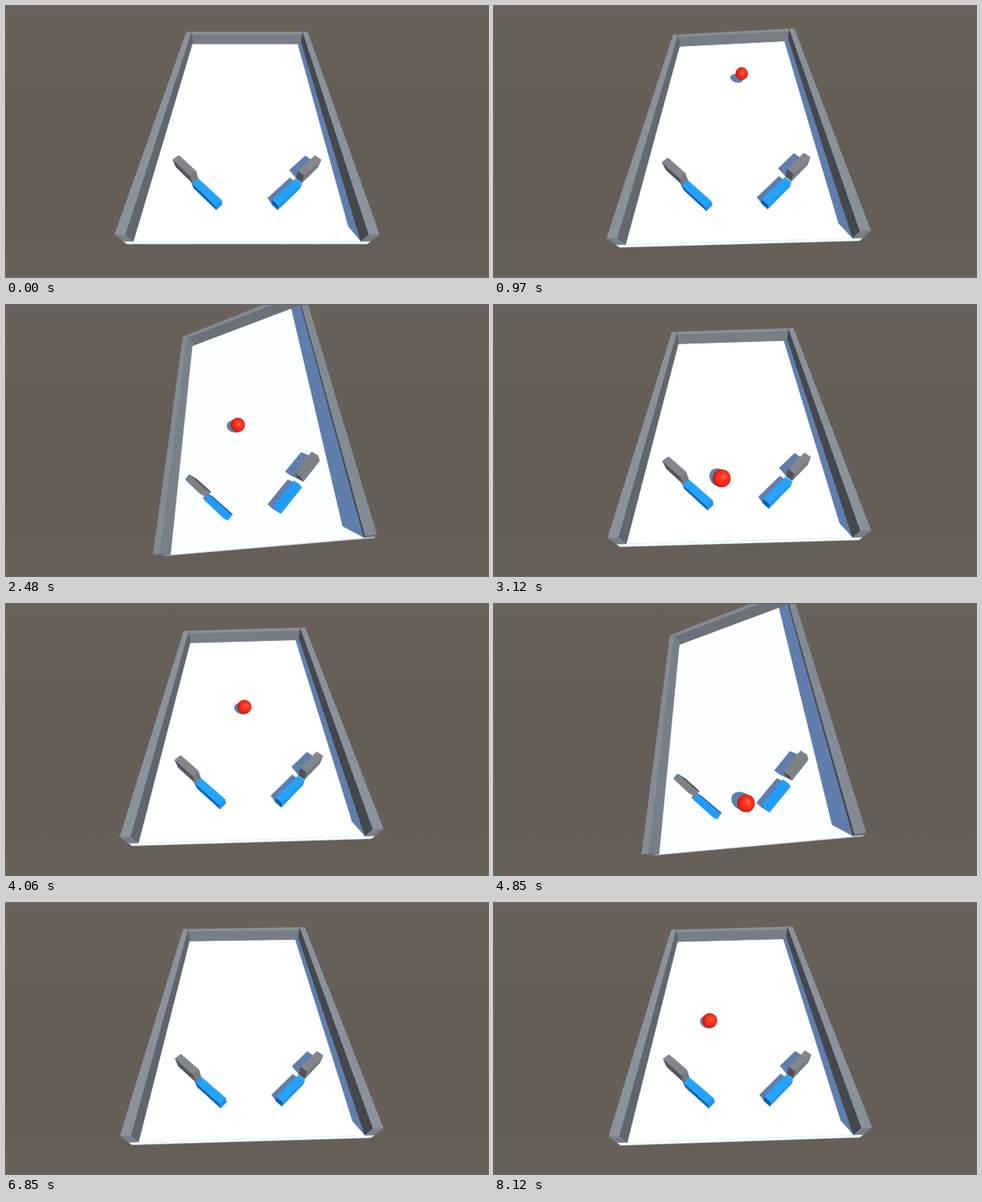
Write an HTML page with a canvas that moves like this. It is 600x338 px and loops after 8150 ms.

```html
<!DOCTYPE html>
<html lang="en">
<head>
<meta charset="utf-8">
<title>Tilting pinball table</title>
<style>
  html, body { margin: 0; width: 100%; height: 100%; overflow: hidden; background: #665f57; }
  canvas { display: block; width: 600px; height: 338px; }
</style>
</head>
<body>
<canvas id="stage" width="600" height="338"></canvas>
<script>
const ctx = document.getElementById('stage').getContext('2d');
const LOOP = 8150, FOCAL = 292.7, RAD = Math.PI / 180;
const CAM = [0, 9.89, -11.2], SIN = 0.767, COS = 0.6415;
const LIGHT = [-0.321, -0.766, 0.557];
const HALF_W = 5, HALF_L = 8.2, WALL = 0.4, WALL_H = 0.82, BALL_R = 0.42;
const GRAVITY = 16;

// Base colour plus the part added by direct light
const STEEL = { dark: [68, 71, 76], lit: [92, 98, 103] };
const STONE = { dark: [68, 69, 71], lit: [82, 86, 89] };
const BLUE = { dark: [8, 78, 150], lit: [36, 112, 150] };
const FLOOR = { dark: [190, 205, 210], lit: [90, 90, 80] };

// Ball contacts: time, x, z
const RALLY = [
  [590, 0.9, 3.5], [1680, -0.2, -6], [3180, -0.75, -6.2],
  [4870, 0.37, -6.65], [5880, -1.15, -8.72]
];
const SERVE = [[7300, -1, 3.5], [LOOP, -1.48, -2.28]];
const FLIPS = [...RALLY.slice(1, 4).map(hit => hit[0] - 20), 5800];

const clamp = v => Math.max(0, Math.min(1, v));
const smooth = v => { const u = clamp(v); return u * u * (3 - 2 * u); };
const dot = (a, b) => a[0] * b[0] + a[1] * b[1] + a[2] * b[2];

// Rises from t0 to full, holds, and is back to zero at t1
const push = (t, t0, t1) => smooth((t - t0) / 520) * smooth((t1 - t) / 540);
const tilt = t => push(t, 860, 3000) + push(t, 4190, 5880);

// Roll leads, pitch follows a little later, yaw drifts over time
function poseAt(t) {
  const drift = 1 - Math.exp(-t / 2500);
  const sway = 1 - Math.cos(t / 1000);
  return [
    20.3 * tilt(t) + 0.6 * sway,
    10 * tilt(t - 160) + 0.4 * drift,
    1.6 * tilt(t) + 1.7 * drift
  ].map(angle => angle * RAD);
}

function makeTurn([roll, pitch, yaw]) {
  const spin = (a, b, angle) => [
    a * Math.cos(angle) - b * Math.sin(angle),
    a * Math.sin(angle) + b * Math.cos(angle)
  ];
  return ([x, y, z]) => {
    [x, y] = spin(x, y, roll);
    [z, y] = spin(z, y, pitch);
    [x, z] = spin(x, z, yaw);
    return [x, y, z];
  };
}

function project([x, y, z]) {
  const dy = y - CAM[1], dz = z - CAM[2];
  const up = dy * COS + dz * SIN, depth = dz * COS - dy * SIN;
  return [300 + FOCAL * x / depth, 169 - FOCAL * up / depth, FOCAL / depth];
}

// Box centred at x, z with its long axis turned by angle
function box(x, z, angle, length, width, y0, y1, paint) {
  const c = Math.cos(angle), s = Math.sin(angle), corners = [];
  for (let i = 0; i < 8; i++) {
    const a = (i & 1 ? 1 : -1) * length / 2, b = (i & 2 ? 1 : -1) * width / 2;
    corners.push([x + a * c - b * s, i & 4 ? y1 : y0, z + a * s + b * c]);
  }
  const faces = [
    [[c, 0, s], 1, 3, 7, 5], [[-c, 0, -s], 0, 2, 6, 4],
    [[-s, 0, c], 2, 3, 7, 6], [[s, 0, -c], 0, 1, 5, 4],
    [[0, 1, 0], 4, 5, 7, 6]
  ];
  return { corners, faces, paint };
}

function tracePath(points) {
  ctx.beginPath();
  points.forEach(p => ctx.lineTo(p[0], p[1]));
  ctx.closePath();
}

function drawBox({ corners, faces, paint }, turn) {
  const world = corners.map(turn);
  for (const [normal, ...ids] of faces) {
    const n = turn(normal), p = world[ids[0]];
    if (dot(n, CAM.map((v, k) => v - p[k])) <= 0) continue;
    const light = Math.max(0, -dot(n, LIGHT));
    const rgb = paint.dark.map((v, k) => Math.min(255, Math.round(v + paint.lit[k] * light)));
    tracePath(ids.map(i => project(world[i])));
    ctx.fillStyle = ctx.strokeStyle = `rgb(${rgb})`;
    ctx.lineWidth = 0.4;
    ctx.fill();
    ctx.stroke();
  }
}

function hull(points) {
  const sorted = points.slice().sort((a, b) => a[0] - b[0] || a[1] - b[1]);
  const half = list => {
    const out = [];
    for (const p of list) {
      while (out.length > 1) {
        const [a, b] = out.slice(-2);
        if ((b[0] - a[0]) * (p[1] - a[1]) - (b[1] - a[1]) * (p[0] - a[0]) > 0) break;
        out.pop();
      }
      out.push(p);
    }
    return out.slice(0, -1);
  };
  return [...half(sorted), ...half(sorted.reverse())];
}

function drawShadow(points, turn, light) {
  const flat = points.map(([x, y, z]) => {
    const k = y / -light[1];
    return project(turn([x + light[0] * k, 0, z + light[2] * k]));
  });
  tracePath(hull(flat));
  ctx.fill();
}

// Outline of the ball as seen from the light
function ballRim([x, y, z], light) {
  const m = Math.hypot(light[0], light[1]);
  const u = [-light[1] / m, light[0] / m, 0];
  const w = [
    light[1] * u[2] - light[2] * u[1],
    light[2] * u[0] - light[0] * u[2],
    light[0] * u[1] - light[1] * u[0]
  ];
  return Array.from({ length: 28 }, (_, i) => {
    const c = Math.cos(i * Math.PI / 14) * BALL_R, s = Math.sin(i * Math.PI / 14) * BALL_R;
    return [x + u[0] * c + w[0] * s, y + u[1] * c + w[1] * s, z + u[2] * c + w[2] * s];
  });
}

// Parabolic flight between two neighbouring contacts; the last one runs on off the table
function ballAt(t) {
  const hits = t < SERVE[0][0] ? RALLY : SERVE;
  if (t < hits[0][0] || t > hits.at(-1)[0] + 250) return null;
  let i = 0;
  while (i < hits.length - 2 && t >= hits[i + 1][0]) i++;
  const [t0, x0, z0] = hits[i], [t1, x1, z1] = hits[i + 1];
  const u = (t - t0) / (t1 - t0), span = (t1 - t0) / 1000;
  const z = z0 + (z1 - z0) * u + GRAVITY / 2 * span * span * u * (1 - u);
  const drop = i ? 0 : 2.2 - 10 * ((t - t0) / 1000) ** 2;
  const sink = 0.15 * Math.max(0, -HALF_L - z) ** 2;
  return [x0 + (x1 - x0) * u, Math.max(BALL_R, drop) - sink, z];
}

function drawBall(pos, turn) {
  const [x, y, scale] = project(turn(pos)), r = BALL_R * scale;
  const g = ctx.createRadialGradient(x + r * 0.28, y - r * 0.16, 0, x + r * 0.1, y - r * 0.05, r * 1.12);
  g.addColorStop(0, '#ff6a50');
  g.addColorStop(0.3, '#ff3e28');
  g.addColorStop(0.75, '#ee2416');
  g.addColorStop(1, '#a3160f');
  ctx.fillStyle = g;
  ctx.beginPath();
  ctx.arc(x, y, r, 0, 7);
  ctx.fill();
}

function flipperAngle(t) {
  const lift = Math.max(...FLIPS.map(s => Math.min(clamp((t - s) / 60), clamp((s + 240 - t) / 80))));
  return -43 * RAD * (1 - lift);
}

const floor = box(0, 0, 0, HALF_W * 2, HALF_L * 2, -0.36, 0, FLOOR);
const sideWall = side =>
  box(side * (HALF_W - WALL / 2), 0, 0, WALL, HALF_L * 2, 0, WALL_H, STEEL);
const walls = [
  box(0, HALF_L - WALL / 2, 0, (HALF_W - WALL) * 2, WALL, 0, WALL_H, STEEL),
  sideWall(-1), sideWall(1)
];
const guides = [-1, 1].map(side =>
  box(side * 2.97, -4.93, side * 43.5 * RAD, 1.3, 0.36, 0, 0.65, STONE));

function flippers(t) {
  const angle = flipperAngle(t), length = 1.57;
  return [-1, 1].map(side => box(
    side * (2.38 - Math.cos(angle) * length / 2),
    -5.66 + Math.sin(angle) * length / 2,
    -side * angle, length, 0.36, 0, 0.42, BLUE));
}

function drawSky() {
  const g = ctx.createLinearGradient(0, 0, 0, 338);
  g.addColorStop(0, '#69625a');
  g.addColorStop(0.5, '#645d55');
  g.addColorStop(1, '#666059');
  ctx.fillStyle = g;
  ctx.fillRect(0, 0, 600, 338);
}

function draw(t) {
  const turn = makeTurn(poseAt(t));
  const light = [[1, 0, 0], [0, 1, 0], [0, 0, 1]].map(axis => dot(LIGHT, turn(axis)));
  const parts = [...guides, ...flippers(t)];
  const ball = ballAt(t);

  drawSky();
  drawBox(floor, turn);

  ctx.save();
  tracePath([4, 5, 7, 6].map(i => project(turn(floor.corners[i]))));
  ctx.clip();
  ctx.fillStyle = '#607eac';
  [...walls, ...parts].forEach(b => drawShadow(b.corners, turn, light));
  if (ball) drawShadow(ballRim(ball, light), turn, light);
  ctx.restore();

  [...walls, ...parts].forEach(b => drawBox(b, turn));
  if (ball) drawBall(ball, turn);
}

const start = performance.now();
function tick() {
  draw((performance.now() - start) % LOOP);
  requestAnimationFrame(tick);
}
tick();
</script>
</body>
</html>
```
